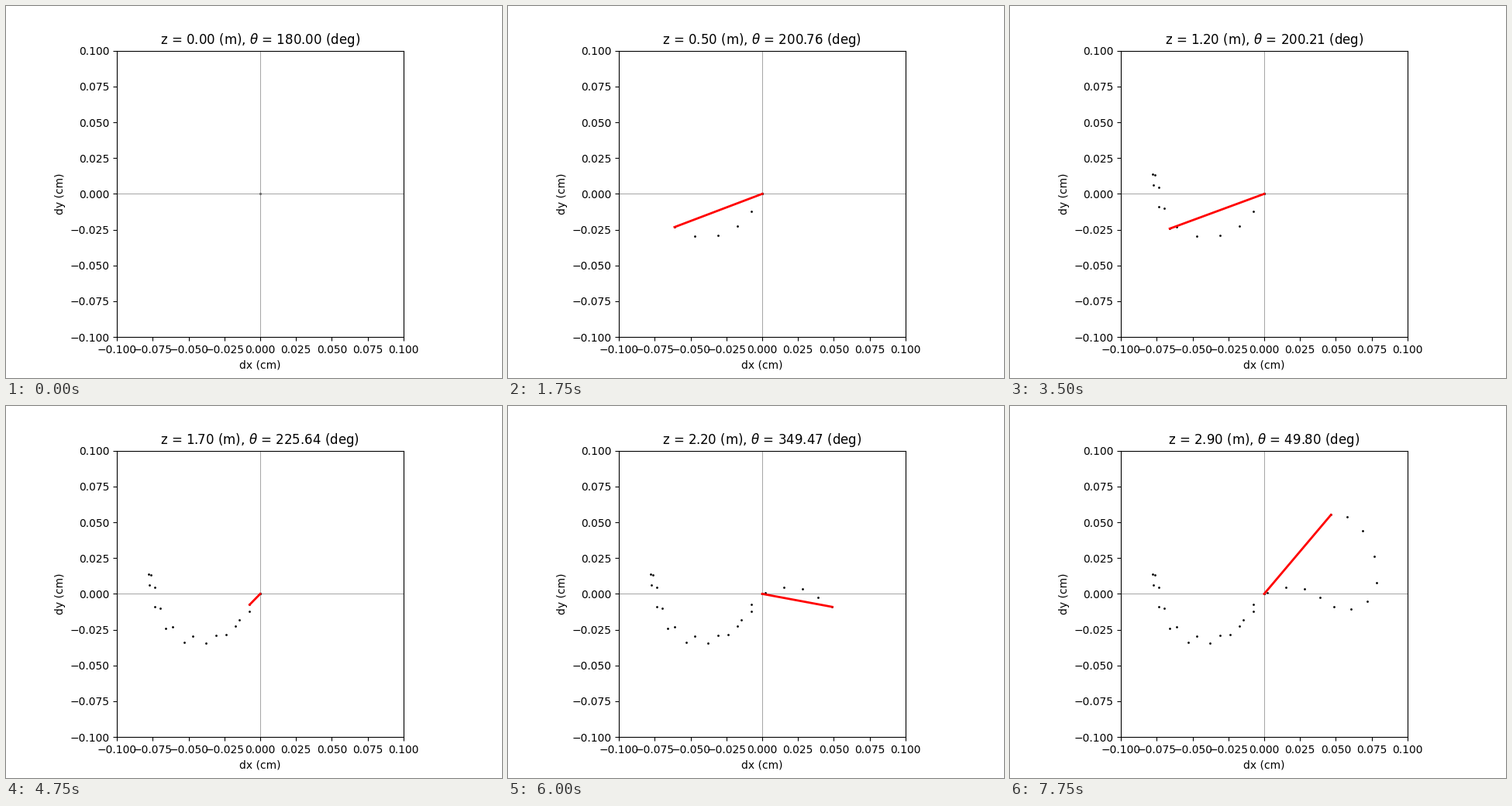
A matplotlib script for the animation above (8 s loop, 640 by 480 pixels).

```python
import matplotlib.pyplot as plt
import numpy as np
from matplotlib.animation import FuncAnimation

STEP_MS = 250
STEPS = 32
HOLD = 3        # steps spent at the starting point
DZ = 0.1        # metres travelled per step
KEY_GAP = 2.5   # steps between key points

# Key displacements in micrometres, joined by a smooth curve.
KEYS = np.array([
    (0, 0), (-234, -263), (-612, -232), (-750, 99), (-774, 60),
    (-602, -301), (-238, -285), (-30, -28), (281, 34), (544, -108),
    (787, 77), (634, 502), (351, 518),
])


def spline(t, points):
    """Natural cubic spline through points at t = 0, 1, 2, ..."""
    knots = np.arange(len(points))

    def cubic(s):
        return np.abs(np.subtract.outer(s, knots)) ** 3

    def linear(s):
        return np.column_stack([np.ones(len(s)), s])

    side = linear(knots)
    system = np.block([[cubic(knots), side], [side.T, np.zeros((2, 2))]])
    weights = np.linalg.solve(system, np.vstack([points, np.zeros((2, 2))]))
    return np.hstack([cubic(t), linear(t)]) @ weights


# The negative zero makes the starting angle 180 degrees.
start = np.tile([-0.0, 0.0], (HOLD, 1))
moving = spline(np.arange(1, STEPS - HOLD + 1) / KEY_GAP, KEYS) * 1e-4
path = np.vstack([start, moving])

fig, ax = plt.subplots(figsize=(6.4, 4.8), dpi=100)
ax.set_aspect("equal")
ax.set_xlim(-0.1, 0.1)
ax.set_ylim(-0.1, 0.1)
ax.set_xlabel("dx (cm)")
ax.set_ylabel("dy (cm)")
ax.axhline(0, color="gray", lw=0.5)
ax.axvline(0, color="gray", lw=0.5)
dots = ax.scatter([], [], s=1, c="black")
arm, = ax.plot([], [], color="red", lw=2)


def update(step):
    x, y = path[step]
    z = max(0, step - HOLD + 1) * DZ
    theta = np.degrees(np.arctan2(y, x)) % 360
    dots.set_offsets(path[:step + 1])
    arm.set_data([0, x], [0, y])
    ax.set_title(rf"z = {z:.2f} (m), $\theta$ = {theta:.2f} (deg)")
    return dots, arm


anim = FuncAnimation(fig, update, frames=STEPS, interval=STEP_MS,
                     repeat=True, repeat_delay=0, blit=False)
plt.show()
```
